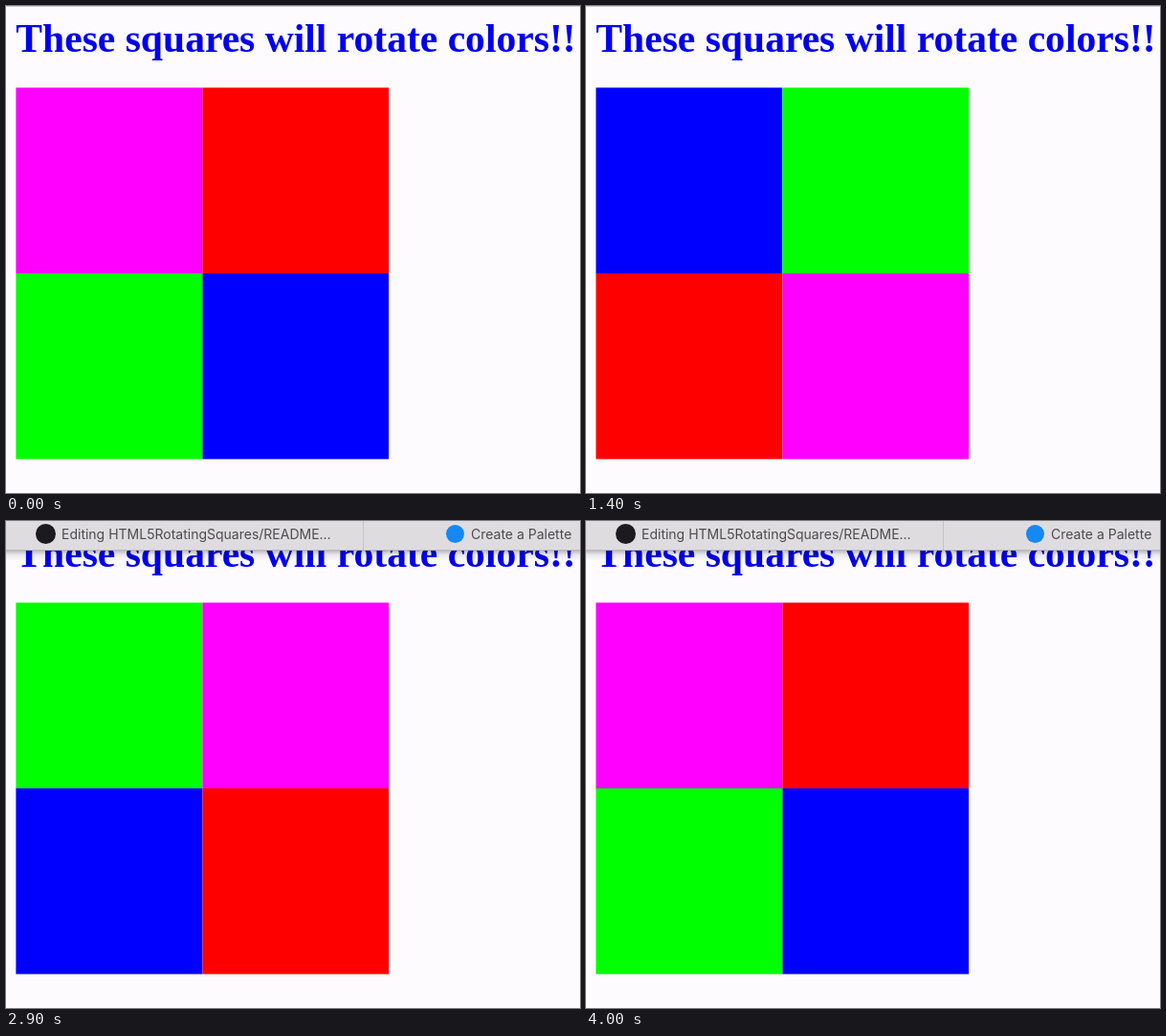
Write an HTML page with a canvas that moves like this. It is 600 px wide and 510 px high and loops after 4.1 s.

```html
<!DOCTYPE html>
<html lang="en">
<head>
<meta charset="utf-8">
<title>Rotating squares</title>
<style>
html, body { margin: 0; width: 100%; height: 100%; overflow: hidden; background: #fdfbfe; }
canvas { display: block; }
</style>
</head>
<body>
<canvas id="stage" width="600" height="510"></canvas>
<script>
const ctx = document.getElementById('stage').getContext('2d');
const LOOP = 4100, BAR = 31;
// Clockwise from the top left; each turn moves every colour one place back.
const COLORS = ['#ff00ff', '#ff0000', '#0000ff', '#00ff00'];
const CORNERS = [[0, 0], [1, 0], [1, 1], [0, 1]];

function rect(color, x, y, w, h) {
  ctx.fillStyle = color;
  ctx.fillRect(x, y, w, h);
}

function text(str, x, y, font, color) {
  ctx.font = font;
  ctx.fillStyle = color;
  ctx.fillText(str, x, y);
}

function dot(x, y, r, color) {
  ctx.fillStyle = color;
  ctx.beginPath();
  ctx.arc(x, y, r, 0, Math.PI * 2);
  ctx.fill();
}

function drawPage(turns) {
  rect('#fdfbfe', 0, 0, 600, 510);
  rect('#d3d1d4', 0, 0, 600, 1);
  text('These squares will rotate colors!!', 10.3, 48,
    'bold 41.6px "Liberation Serif", Times, serif', '#0000ee');
  CORNERS.forEach(([cx, cy], i) => {
    rect(COLORS[(i + turns) % 4], cx ? 205.3 : 10.4, cy ? 280 : 85.5, 194.8, 194.5);
  });
}

function drawTabs(shown) {
  const font = '14px Inter, Roboto, sans-serif', ink = '#4d4b4e';
  ctx.save();
  ctx.translate(0, (shown - 1) * BAR);
  const shade = ctx.createLinearGradient(0, BAR, 0, BAR + 11);
  shade.addColorStop(0, 'rgba(0,0,0,.26)');
  shade.addColorStop(0.4, 'rgba(0,0,0,.08)');
  shade.addColorStop(1, 'rgba(0,0,0,0)');
  rect(shade, 0, BAR, 600, 11);
  rect('#dfdce0', 0, 0, 600, BAR);
  rect('#c6c3c7', 373, 0, 1, BAR);
  rect('#bab8bb', 0, BAR - 1, 600, 1);
  dot(41.5, 13.5, 10.5, '#1b1a1f');
  text('Editing HTML5RotatingSquares/README…', 58, 19, font, ink);
  dot(469.5, 13.5, 9.5, '#1488f5');
  text('Create a Palette', 486, 19, font, ink);
  ctx.restore();
}

function frame(now) {
  const t = Math.floor(now % LOOP / 100) * 100;
  drawPage(Math.floor((t + 600) / 1000));
  const p = Math.min(1, Math.max(0, (t - 2600) / 300));
  if (p > 0) drawTabs(p * p * (3 - 2 * p));
  requestAnimationFrame(frame);
}
requestAnimationFrame(frame);
</script>
</body>
</html>
```
